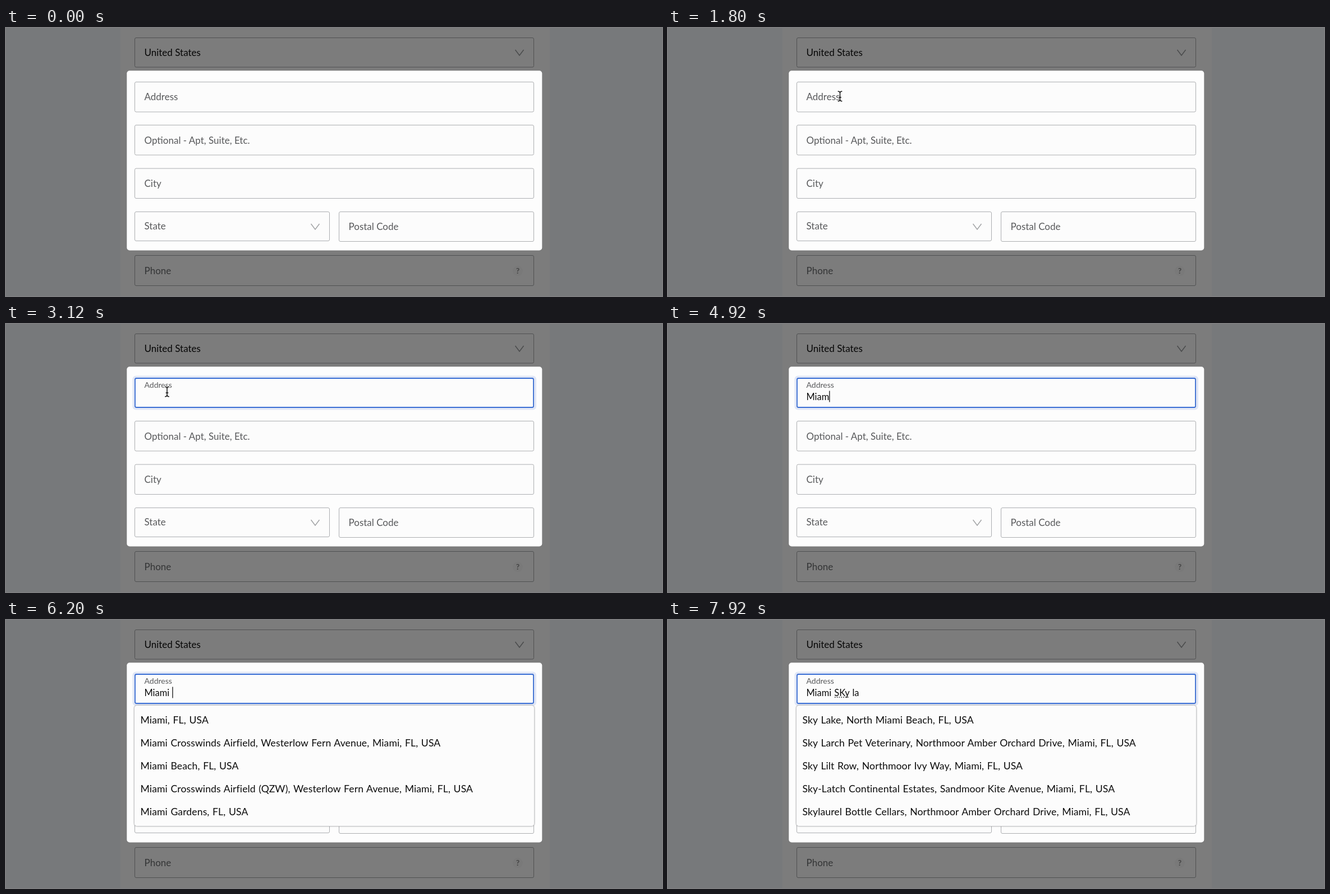
An HTML page for the animation above (8000 ms loop, 1169x479 px).

```html
<!DOCTYPE html>
<html lang="en">
<head>
<meta charset="utf-8">
<title>Address autocomplete</title>
<style>
  html, body { margin: 0; width: 100%; height: 100%; overflow: hidden; background: #77797b; }
  svg { display: block; width: 1169px; height: 479px; }
  text { font: 17px Lato, "Open Sans", sans-serif; fill: #58595b; white-space: pre; }
  .field { fill: #fcfcfc; stroke: #acaeb1; }
  .dim .field { fill: none; stroke: #505152; }
  .dim text { fill: #343536; }
  .dim .value { fill: #060606; }
  .chevron { fill: none; stroke: #a2a4a6; stroke-width: 1.5; }
  .dim .chevron { stroke: #4a4b4c; }
  #typed { font-size: 16.4px; word-spacing: 1px; fill: #0a0a0a; }
  #list text { font-size: 17.6px; letter-spacing: .1px; word-spacing: 1px; fill: #0c0c0c; }
  #panel { fill: #fcfcfc; stroke: #c8c9cb; filter: drop-shadow(0 .5px 1.2px rgba(0, 0, 0, .28)); }
  #spell { stroke: #4c4d4f; stroke-width: 2.2; stroke-linecap: round; stroke-dasharray: 0 3.8; }
</style>
</head>
<body>
<svg id="stage" viewBox="0 0 1169 479">
  <rect width="1169" height="479" fill="#77797b"/>
  <rect x="204" width="765" height="479" fill="#7c7c7c"/>
  <g id="page" class="dim"></g>
  <rect x="215.3" y="76.3" width="740" height="321.2" rx="5" fill="#fdfdfd"/>
  <g id="card"></g>

  <g id="focus">
    <rect x="227.5" y="94.5" width="715.5" height="57" rx="4" fill="none" stroke="#e1e7f6" stroke-width="4"/>
    <rect x="230" y="97" width="710" height="52" rx="2.5" fill="#fcfcfc" stroke="#3a6ed4" stroke-width="1.8"/>
  </g>
  <text id="label" x="246.5">Address</text>
  <line id="spell" y1="138" y2="138"/>
  <text id="typed" x="246.5" y="136"></text>
  <rect id="caret" y="119.5" width="1.3" height="20" fill="#111"/>

  <g id="list">
    <rect id="panel" x="228.5" y="152.5" width="713" rx="5"/>
    <g id="items"></g>
  </g>

  <g id="cursor">
    <g id="beam" fill="none" stroke-linecap="round">
      <path id="beamHalo" stroke="#fff" stroke-width="3.2"/>
      <path id="beamLine" stroke="#111" stroke-width="1.5"/>
    </g>
    <path id="arrow" d="M0 0V16L3.8 12.5L6.3 18.3L9 17.2L6.5 11.5H11.5Z" fill="#111" stroke="#fff"/>
  </g>
</svg>
<script>
const LOOP = 8000;
const $ = id => document.getElementById(id);

function add(parent, tag, attrs, content = '') {
  const el = document.createElementNS('http://www.w3.org/2000/svg', tag);
  for (const key in attrs) el.setAttribute(key, attrs[key]);
  el.textContent = content;
  parent.append(el);
  return el;
}

function field(parent, x, y, w, h, caption, baseline, cls = '') {
  add(parent, 'rect', { class: 'field', x, y, width: w, height: h, rx: 2.5 });
  if (caption) add(parent, 'text', { x: x + 17, y: baseline, class: cls }, caption);
  return [x, y, w, h];
}

const chevron = (parent, x, y) =>
  add(parent, 'path', { class: 'chevron', d: `M${x - 7.5} ${y - 5}L${x} ${y + 5}L${x + 7.5} ${y - 5}` });

const page = $('page'), card = $('card');
field(page, 229.5, 17.5, 711, 52.5, 'United States', 49.5, 'value');
chevron(page, 915, 44);
field(page, 229.5, 406.5, 711, 54, 'Phone', 440);
add(page, 'circle', { cx: 912, cy: 434, r: 9, fill: '#797979' });
add(page, 'text', { x: 912, y: 439, 'text-anchor': 'middle', style: 'font-size:14px;font-weight:700;fill:#444' }, '?');

const textFields = [
  field(card, 229.5, 96.5, 711, 53.5),
  field(card, 229.5, 173.5, 711, 53.5, 'Optional - Apt, Suite, Etc.', 206.5),
  field(card, 229.5, 251, 711, 53.5, 'City', 284),
  field(card, 593.5, 328.5, 347, 53, 'Postal Code', 361)
];
field(card, 229.5, 328.5, 347, 52, 'State', 360);
chevron(card, 551, 355);

const beamPath = 'M-3.3 -8.7Q0 -8.7 0 -5.5Q0 -8.7 3.3 -8.7M0 -5.5V5.5M-3.3 8.7Q0 8.7 0 5.5Q0 8.7 3.3 8.7M-1.8 2H1.8';
$('beamHalo').setAttribute('d', beamPath);
$('beamLine').setAttribute('d', beamPath);

// Steps: [time, value]; each value holds until the next step.
const typing = [
  [0, ''], [4160, 'M'], [4400, 'Mi'], [4600, 'Mia'], [4920, 'Miam'], [5040, 'Miami'], [5200, 'Miami '],
  [6440, 'Miami S'], [6560, 'Miami SK'], [6840, 'Miami SKy'], [7000, 'Miami SKy '],
  [7160, 'Miami SKy l'], [7360, 'Miami SKy la']
];
const caretSteps = [
  [0, false], [2400, true], [2920, false], [3440, true], [3960, false], [4160, true],
  [5720, false], [6200, true], [7880, false]
];
const city = ', Miami, FL, USA';
const lists = [
  [0, []],
  [6080, [
    'Miami, FL, USA',
    'Miami Crosswinds Airfield, Westerlow Fern Avenue' + city,
    'Miami Beach, FL, USA',
    'Miami Crosswinds Airfield (QZW), Westerlow Fern Avenue' + city,
    'Miami Gardens, FL, USA'
  ]],
  [7000, [
    'Skybramble Lookout Carousel Park, Tidewick Boulevard' + city,
    'Miami Skyhopper School, Sandmoor Wren Street' + city,
    'Skytern On Tilwick, Tilwick Avenue' + city,
    'SKORVANE Clearance Market, Sandmoor Kite Avenue' + city,
    'Palmy Derm Dr.: Bertrand Owen Quillfern, DO, FAOCD, Westerlow Pine Avenue,\nDoral, FL, USA'
  ]],
  [7840, [
    'Sky Lake, North Miami Beach, FL, USA',
    'Sky Larch Pet Veterinary, Northmoor Amber Orchard Drive' + city,
    'Sky Lilt Row, Northmoor Ivy Way' + city,
    'Sky-Latch Continental Estates, Sandmoor Kite Avenue' + city,
    'Skylaurel Bottle Cellars, Northmoor Amber Orchard Drive' + city
  ]]
];
// Pointer path: [time, x, y]
const pointer = [
  [240, 1160, -12], [480, 640, 290], [800, 640, 290], [1600, 322, 128],
  [1800, 306.5, 122], [2080, 287, 121], [4160, 287, 121]
];

const held = (steps, t) => steps.findLast(([at]) => t >= at)[1];
const mix = (a, b, k) => a + (b - a) * k;
const smooth = k => k * k * (3 - 2 * k);
const show = (id, on) => { $(id).style.display = on ? '' : 'none'; };

function drawFocus(t) {
  const k = smooth(Math.min(1, Math.max(0, (t - 2360) / 280)));
  $('focus').style.opacity = k;
  $('label').setAttribute('y', mix(129, 114, k));
  $('label').style.fontSize = mix(17, 14, k) + 'px';
}

function drawInput(t) {
  const value = held(typing, t), typed = $('typed'), left = 246.5;
  typed.textContent = value;
  show('caret', held(caretSteps, t));
  $('caret').setAttribute('x', left + (value ? typed.getComputedTextLength() : 0));
  const marked = t >= 7000;
  show('spell', marked);
  if (marked) {
    $('spell').setAttribute('x1', left + typed.getSubStringLength(0, 6) + 1.5);
    $('spell').setAttribute('x2', left + typed.getSubStringLength(0, 9));
  }
}

let shown;
function drawList(t) {
  const list = held(lists, t);
  if (list === shown) return;
  shown = list;
  show('list', list.length);
  $('items').replaceChildren();
  let extra = 0;
  list.forEach((item, row) => item.split('\n').forEach((line, i) => {
    add($('items'), 'text', { x: 239.5, y: 185 + row * 41 + i * 18 }, line);
    extra += i * 18;
  }));
  $('panel').setAttribute('height', 216 + extra);
}

function drawCursor(t) {
  const next = pointer.findIndex(([at]) => at > t);
  show('cursor', next > 0);
  if (next < 1) return;
  const [t0, x0, y0] = pointer[next - 1], [t1, x1, y1] = pointer[next];
  const k = smooth((t - t0) / (t1 - t0));
  const px = mix(x0, x1, k), py = mix(y0, y1, k);
  const overText = textFields.some(([x, y, w, h]) => px > x && px < x + w && py > y && py < y + h);
  show('beam', overText);
  show('arrow', !overText);
  $('cursor').setAttribute('transform', `translate(${px} ${py})`);
}

let start;
function frame(now) {
  start ??= now;
  const t = (now - start) % LOOP;
  drawFocus(t);
  drawInput(t);
  drawList(t);
  drawCursor(t);
  requestAnimationFrame(frame);
}
requestAnimationFrame(frame);
</script>
</body>
</html>
```
